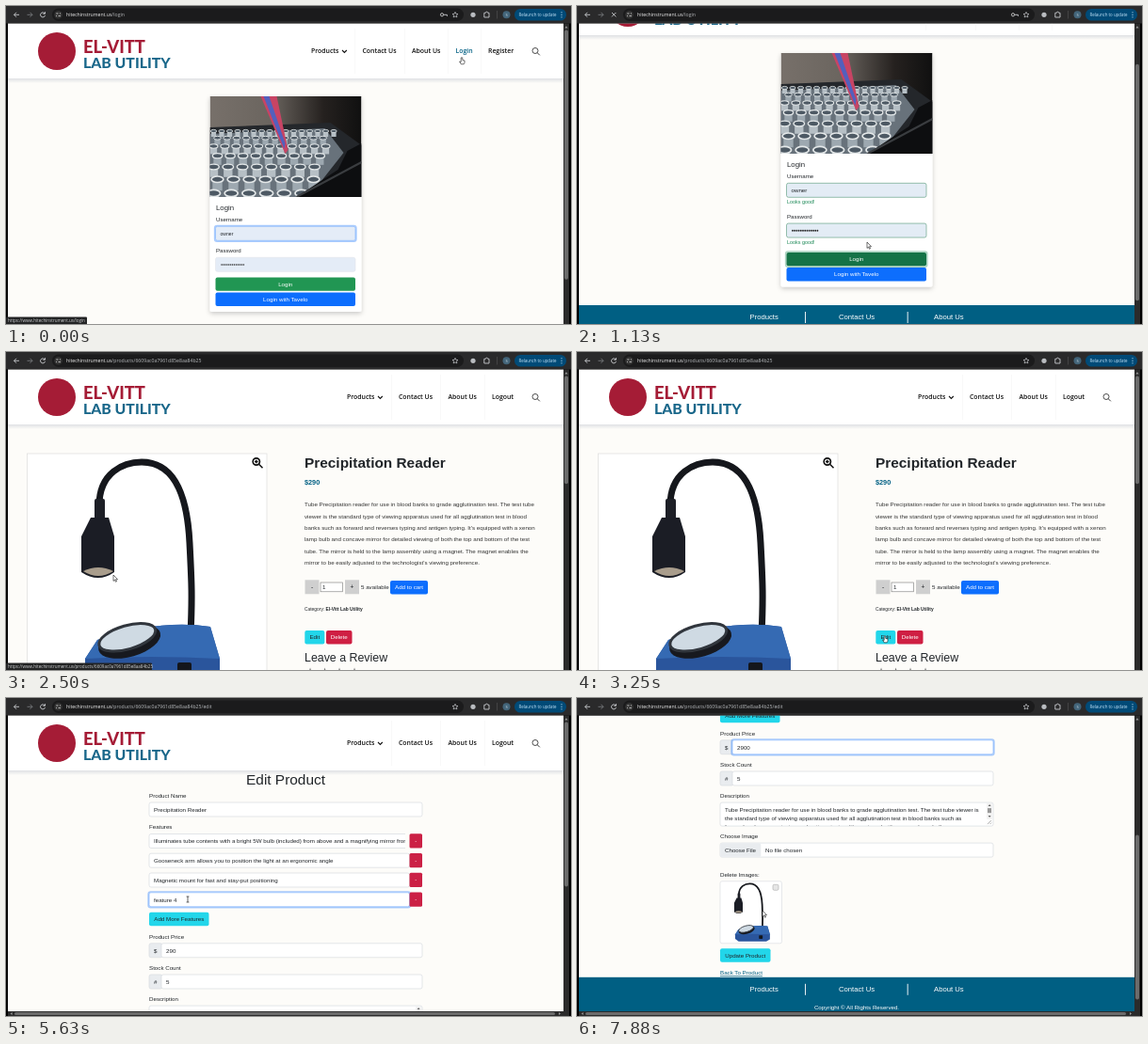
These frames come from a looping animation (600x338 px, 8000 ms). An HTML page:

```html
<!DOCTYPE html>
<html lang="en">
<head>
<meta charset="utf-8">
<title>Shop walkthrough</title>
<style>
html, body { margin: 0; width: 100%; height: 100%; overflow: hidden; background: #000; }
svg { display: block; width: 100%; height: 100%; }
text { font-family: "Liberation Sans", Arial, sans-serif; white-space: pre; }
.ui { font-family: "Open Sans", sans-serif; }
.nav { font-family: "Open Sans", sans-serif; font-weight: 600; }
.brand { font-family: Lato, sans-serif; font-weight: 800; }
</style>
</head>
<body>
<svg id="stage" viewBox="0 0 600 338" preserveAspectRatio="none"></svg>
<script>
const stage = document.getElementById('stage');
const LOOP = 8000, STEP = 125, INK = '#212529', TEAL = '#005f83';
const HOST = 'hitechinstrument.us', ITEM = '/products/6609ac0a7961d85e8aa84b25';
const PRODUCT = 'Precipitation Reader';

// Times at which the page changes
const SUBMIT = 1000, SHOP = 1750, EDIT = 3500, ADD = 4500, PRICE = 6500;

const CURSOR = [
  [125, 484, 55], [625, 308, 251], [1250, 308, 251], [1875, 114, 237], [2625, 114, 237],
  [3250, 327, 302], [3500, 327, 302], [4000, 237, 210], [4125, 237, 210], [4375, 183, 213],
  [4500, 183, 213], [4750, 193, 214], [6125, 193, 214], [6375, 190, 152], [6625, 190, 152],
  [6875, 192, 213], [7125, 192, 213], [7750, 197, 226]
];
const LOGIN_SCROLL = [[375, 0], [875, 46]];
const EDIT_SCROLL = [[5625, 0], [6125, 115.5], [7125, 115.5], [7750, 216]];

function tween(keys, t) {
  const i = keys.findIndex(k => k[0] > t);
  if (i === 0) return keys[0].slice(1);
  if (i < 0) return keys[keys.length - 1].slice(1);
  const a = keys[i - 1], b = keys[i], p = (t - a[0]) / (b[0] - a[0]);
  const e = p * p * (3 - 2 * p);
  return a.slice(1).map((v, j) => v + (b[j + 1] - v) * e);
}

// Drawing helpers; text is placed by the middle of its capitals
const text = (x, y, size, s, fill = INK, more = '') =>
  `<text x="${x}" y="${y + size * .36}" font-size="${size}" fill="${fill}" ${more}>${s}</text>`;
const rect = (x, y, w, h, fill, more = '') =>
  `<rect x="${x}" y="${y}" width="${w}" height="${h}" fill="${fill}" ${more}/>`;
const path = (d, fill, stroke = 'none', width = 1, more = '') =>
  `<path d="${d}" fill="${fill}" stroke="${stroke}" stroke-width="${width}" ${more}/>`;
const circle = (x, y, r, fill, more = '') => `<circle cx="${x}" cy="${y}" r="${r}" fill="${fill}" ${more}/>`;
const group = (x, y, s, scale = 1) => `<g transform="translate(${x} ${y}) scale(${scale})">${s}</g>`;
const MID = 'text-anchor="middle"', BOLD = 'font-weight="bold"';

const button = (x, y, w, label, fill, color = '#fff', h = 14.5) =>
  rect(x, y, w, h, fill, 'rx="2"') + text(x + w / 2, y + h / 2, 6.2, label, color, MID);
const ring = (x, y, w, h, color = '#0d6efd') =>
  rect(x - .8, y - .8, w + 1.6, h + 1.6, 'none', `rx="2.4" stroke="${color}" stroke-opacity=".35" stroke-width="1.7"`);
const field = (x, y, w, value = '', o = {}) =>
  (o.focus ? ring(x, y, w, 15) : '') +
  rect(x, y, w, o.h || 15, o.fill || '#fff', `rx="2" stroke="${o.focus ? '#86b7fe' : o.line || '#d7dbe0'}" stroke-width=".7"`) +
  text(x + 5, y + 7.5, o.size || 6.2, value);

function header(loggedIn, active) {
  const items = loggedIn
    ? [[362, 'Products'], [417, 'Contact Us'], [469.5, 'About Us'], [516, 'Logout']]
    : [[324, 'Products'], [378.5, 'Contact Us'], [431, 'About Us'], [477.5, 'Login'], [512, 'Register']];
  const x = items[0][0] + 33;
  return rect(2, 77, 590, 5, 'url(#shade)') + rect(2, 18, 590, 59, '#fff') +
    circle(54, 48, 20, '#a51c36') +
    text(82, 43.5, 18.4, 'EL-VITT', '#a51c36', 'class="brand"') +
    text(82, 60, 15.8, 'LAB UTILITY', '#19678a', 'class="brand"') +
    items.map(([x, s], i) => (i ? rect(x - 8, 24, .5, 48, '#f2f2f2') : '') +
      text(x, 47.5, 6.9, s, s === active ? TEAL : '#111', 'class="nav"')).join('') +
    path(`M${x} 47l2.4 2.4 2.4-2.4`, 'none', '#111', 1.1) +
    circle(562, 47.5, 3, 'none', 'stroke="#222" stroke-width=".8"') + path('M564.2 49.7l2.6 2.6', 'none', '#222', .9);
}

const footer = y => rect(2, y, 590, 44, TEAL) +
  [[183.5, 'Products'], [278, 'Contact Us'], [379, 'About Us']].map(([x, s]) => text(x, y + 12.3, 7.7, s, '#fff')).join('') +
  rect(242, y + 7, .9, 12, '#fff') + rect(350.7, y + 7, .9, 12, '#fff') +
  text(297, y + 32, 6.2, 'Copyright © All Rights Reserved.', '#fff', MID);

function photo() {
  let s = rect(0, 0, 161, 107, 'url(#bench)') + path('M0 33L128 28 161 52V107H0Z', '#24272b') +
    path('M0 40L122 34 142 60 105 107H0Z', '#68727b');
  for (let row = 0; row < 7; row++) {
    const k = 1 + row * .2, y = 37 + row * row * .75 + row * 6.5;
    for (let x = 4 + row % 2 * 4; x < 132 - row * 3; x += 8.5 * k) {
      s += rect(x - 2.6 * k, y, 5.2 * k, 6 * k, row % 2 ? '#9da8b0' : '#b6bfc5') +
        `<ellipse cx="${x}" cy="${y}" rx="${3.2 * k}" ry="${1.6 * k}" fill="#4d5964" stroke="#e3e7e8" stroke-width="${.8 * k}"/>`;
    }
  }
  return s + path('M161 50V107H92L136 78 146 58Z', '#0d0e10') + path('M92 107L161 70', 'none', '#3a3d40', 2) +
    path('M54 0H71L83 57 80 61 76 52Z', '#c84464') + path('M57 0H63L80 50 79 56Z', '#5360bd');
}

const lamp = () =>
  path('M77 55C77 20 103 9 122 9C162 9 171 55 173 95S176 150 174 192', 'none', '#15171c', 7) +
  path('M62 218L75 198Q140 176 195 184L205 218V238L190 247H76L62 236Z', '#2a559c') +
  path('M62 218L75 198Q140 176 195 184L205 218Q130 214 62 218Z', '#356ab3') +
  rect(160, 222, 15, 14, '#14161b', 'rx="2"') +
  '<g transform="rotate(-16 108 196)"><ellipse cx="108" cy="200" rx="34" ry="16" fill="#17191f"/>' +
  '<ellipse cx="107" cy="195" rx="31" ry="12.5" fill="#cfdae3" stroke="#31363d" stroke-width="3"/></g>' +
  rect(72, 48, 11, 26, '#1d1f26', 'rx="2"') + path('M68 68H87L93 88V126Q76 138 58 126V88Z', '#1b1d25') +
  path('M60 125Q76 117 92 125Q76 135 60 125Z', '#a99d8c');

function loginPage(t) {
  const done = t >= SUBMIT, d = done ? 19.5 : 0;
  const opts = done ? { fill: '#e3ecf5', line: '#6aa58a' } : { fill: '#e4ecf7', line: '#e4e7ec' };
  const good = y => done ? text(223, y, 5.4, 'Looks good!', '#198754') : '';
  return header(false, 'Login') +
    rect(216.5, 96, 161, 229 + d, '#fff', 'rx="2" filter="url(#drop)"') + group(216.5, 96, `<g clip-path="url(#frame)">${photo()}</g>`) +
    text(223, 214, 7.8, 'Login') + text(223, 226.5, 6.1, 'Username') +
    field(222.5, 234.3, 148.5, 'owner', { ...opts, size: done ? 6.2 : 5.1, focus: !done }) + good(254.5) +
    text(223, 260 + d / 2, 6.1, 'Password') +
    field(222.5, 267.3 + d / 2, 148.5, '', opts) +
    Array.from({ length: 13 }, (_, i) => circle(229 + i * (done ? 2.2 : 1.95), 275 + d / 2, done ? .9 : .75, '#222')).join('') +
    good(297.5) +
    (done ? ring(222.5, 288.5 + d, 148.5, 14.3, '#198754') : '') +
    button(222.5, 288.5 + d, 148.5, 'Login', done ? '#157347' : '#219653', '#fff', 14.3) +
    button(222.5, 304.5 + d, 148.5, 'Login with Tavelo', '#0d6efd') + footer(344.5 + d);
}

function productPage() {
  const lines = [
    'Tube Precipitation reader for use in blood banks to grade agglutination test. The test tube',
    'viewer is the standard type of viewing apparatus used for all agglutination test in blood',
    "banks such as forward and reverses typing and antigen typing. It's equipped with a xenon",
    'lamp bulb and concave mirror for detailed viewing of both the top and bottom of the test',
    'tube. The mirror is held to the lamp assembly using a magnet. The magnet enables the',
    "mirror to be easily adjusted to the technologist's viewing preference."
  ];
  const step = (x, s) => rect(x, 242.3, 15, 15, '#cfcfcf') + text(x + 7.5, 249.8, 6.5, s, INK, MID);
  return header(true) + rect(22.5, 108, 254.5, 255, '#fff', 'stroke="#dcdcdc" stroke-width=".7"') + group(22, 108, lamp()) +
    circle(265.8, 116.5, 3.6, 'none', 'stroke="#111" stroke-width="1.7"') +
    path('M268.5 119.2l4 4M264 116.5h3.6M265.8 114.7v3.6', 'none', '#111', 1.5) +
    text(317, 117.5, 15.4, PRODUCT, INK, BOLD) + text(317, 138.5, 7.3, '$290', TEAL, BOLD) +
    lines.map((s, i) => text(317, 162 + i * 12.35, 6.2, s, '#333')).join('') +
    step(317.5, '-') + rect(334, 245, 23.5, 9.8, '#fff', 'stroke="#777" stroke-width=".6"') + text(336, 250, 6.2, '1') +
    step(360, '+') + text(377, 250, 6.2, '5 available') + button(408, 243, 40, 'Add to cart', '#0d6efd') +
    text(317, 273, 4.9, `Category: <tspan ${BOLD}>El-Vitt Lab Utility</tspan>`) +
    button(317.3, 296, 21, 'Edit', '#22d6ea', INK) + button(340, 296, 27.5, 'Delete', '#cf1f43') +
    text(317, 324.3, 12.4, 'Leave a Review') +
    [323, 338.5, 354, 370].map(x => text(x, 338.5, 9, '★', '#777', MID + ' style="font-family:\'DejaVu Sans\',sans-serif"')).join('');
}

function editPage(t) {
  const added = t >= ADD, d = added ? 20.8 : 0, priceFocus = t >= PRICE;
  const label = (y, s) => text(152, y, 6.2, s);
  const feature = (y, s, focus) => field(152, y, 276.5, s, { focus }) +
    rect(428.5, y - .2, 13.5, 15.2, '#cb2045', 'rx="1.5"') + text(435.2, y + 7.2, 6, '-', '#fff', MID);
  const addon = (y, sign, value, focus) => rect(152, y, 14, 15, '#e9ecef', 'rx="2" stroke="#d7dbe0" stroke-width=".7"') +
    text(158.7, y + 7.5, 6.2, sign, INK, MID) + field(165, y, 277, value, { focus });
  const typed = 'feature 4'.slice(0, Math.max(0, Math.floor((t - 4800) / 70)));
  const y = 306.3 + d;
  return header(true) + text(297, 86.5, 15.4, 'Edit Product', INK, MID) +
    label(103.5, 'Product Name') + field(152, 111, 290, PRODUCT) + label(136.5, 'Features') +
    `<g clip-path="url(#row)">${field(152, 144.5, 276.5, 'Illuminates tube contents with a bright 5W bulb (included) from above and a magnifying mirror from below')}</g>` +
    rect(428.5, 144.3, 13.5, 15.2, '#cb2045', 'rx="1.5"') + text(435.2, 151.7, 6, '-', '#fff', MID) +
    feature(165.2, 'Gooseneck arm allows you to position the light at an ergonomic angle') +
    feature(186, 'Magnetic mount for fast and stay-put positioning') +
    (added ? feature(206.8, typed, !priceFocus) : '') +
    button(152, 207 + d, 63.5, 'Add More Features', '#22d6ea', INK) +
    label(232.5 + d, 'Product Price') + addon(240 + d, '$', t >= 6750 ? '2900' : '290', priceFocus) +
    label(265.8 + d, 'Stock Count') + addon(273.2 + d, '#', '5') +
    label(299.2 + d, 'Description') + field(152, y, 290, '', { h: 25 }) +
    `<svg x="152" y="${y}" width="290" height="24.6">` +
    ['Tube Precipitation reader for use in blood banks to grade agglutination test. The test tube viewer is',
     'the standard type of viewing apparatus used for all agglutination test in blood banks such as',
     "forward and reverses typing and antigen typing. It's equipped with a xenon lamp bulb"]
      .map((s, i) => text(5, 7.2 + i * 9.4, 6.2, s)).join('') +
    rect(283, .8, 6, 17, '#f3f3f3') + rect(284, 6, 4, 5, '#999') +
    path('M284.6 4l1.5-2 1.5 2zM284.6 14l1.5 2 1.5-2z', '#666') + path('M284 23l4-4M286.5 23l1.5-1.5', 'none', '#777', .6) + '</svg>' +
    label(341.8 + d, 'Choose Image') + field(152, 349.3 + d, 290) +
    rect(152.3, 349.6 + d, 43, 14.4, '#e9ecef', 'rx="1.5"') +
    text(157, 356.8 + d, 6.2, 'Choose File') + text(200, 356.8 + d, 6.2, 'No file chosen') +
    label(383.3 + d, 'Delete Images:') +
    rect(152, 390 + d, 65.5, 66, '#fff', 'rx="2" stroke="#dcdfe3" stroke-width=".7"') + group(152, 390.2 + d, lamp(), .258) +
    rect(208, 393.5 + d, 6, 6, t > 7600 ? '#e6e6e6' : '#fff', 'rx="1.4" stroke="#aaa" stroke-width=".6"') +
    button(152, 461.5 + d, 53.5, 'Update Product', '#22d6ea', INK) +
    text(152, 487.3 + d, 6.2, 'Back To Product', TEAL, 'text-decoration="underline"') + footer(492 + d);
}

function toolbar(url, login, loading) {
  const line = (d, color = '#c9cbce', w = .9) => path(d, 'none', color, w);
  return rect(0, 0, 600, 18.5, '#2a2a2b') + rect(49, 2.5, 437, 13.5, '#1b1b1c', 'rx="6.7"') +
    line('M14 9.3H8.6M11 6.8L8.5 9.3 11 11.8') + line('M22.5 9.3H28M25.5 6.8L28 9.3 25.5 11.8', '#77797c') +
    line(loading ? 'M37 7l4.4 4.4M41.4 7L37 11.4' : 'M41 7.8A2.5 2.5 0 1 0 41.5 10M41.5 6.2V8.3H39.4') +
    circle(55.5, 9.3, 4.3, '#333') + line('M53.3 8h2.2M57 8h1M53 10.6h1M55.5 10.6h2.5', '#ddd', .8) +
    text(64, 9.3, 5.15, `${HOST}<tspan fill="#b5b8bb">${url}</tspan>`, '#eee', 'class="ui"') +
    (login ? circle(463, 9.3, 1.6, 'none', 'stroke="#ccc" stroke-width=".9"') + line('M464.6 9.3h3.8v1.6') : '') +
    line('M477 6.4l.9 1.9 2.1.2-1.6 1.4.5 2.1-1.9-1.1-1.9 1.1.5-2.1-1.6-1.4 2.1-.2z', '#c9cbce', .7) +
    circle(496, 9.3, 2.6, '#b9bcc0') + line('M507.8 7.3h1.6a1.1 1.1 0 0 1 2.2 0h1.4v4.7h-5.2z') +
    rect(521, 5, .6, 8.5, '#555') + circle(531.5, 9.3, 4, '#43657a') + text(531.5, 9.3, 4, 'S', '#dce6ee', `${MID} class="ui"`) +
    rect(540, 3, 55, 12.6, '#004a77', 'rx="6.3"') + text(544.5, 9.3, 4.4, 'Relaunch to update', '#c8e6fb', 'class="ui"') +
    [6.8, 9.3, 11.8].map(y => circle(590, y, .6, '#c8e6fb')).join('');
}

function scrollbars(scroll, height, wide) {
  const view = wide ? 315 : 320, k = (wide ? 300 : 305) / height;
  return rect(592, 18.5, 6, 320, '#2b2b2b') + rect(593, 25.5 + scroll * k, 4, view * k, '#6c6c6c', 'rx="2"') +
    path('M593.4 23.5l1.6-2.2 1.6 2.2z', '#999') +
    (wide ? rect(2, 333, 596, 5, '#2b2b2b') + rect(9, 334, 574, 3, '#6c6c6c', 'rx="1.5"') +
      path('M6.6 334v3l-2-1.5zM587 334v3l2-1.5z', '#999') : '');
}

const status = (s, w) => rect(0, 330.5, w, 8, '#222324', 'rx="1"') + text(2, 334.7, 4.55, `https://www.${HOST}${s}`, '#cfd1d3', 'class="ui"');

const POINTERS = {
  arrow: path('M0 0V6.4L1.5 5.1 2.5 7.3 3.5 6.8 2.5 4.7H4.5Z', '#fff', '#111', .6),
  hand: path('M-.8 0q.8-1 1.6 0V2.4L3 3V5.2L2.2 6.8H-.8L-2.4 4 -.8 4.4Z', '#fff', '#111', .6),
  beam: path('M-1.4-3H1.4M0-3V3M-1.4 3H1.4', 'none', '#222', .7)
};

function pointer(t) {
  const [x, y] = tween(CURSOR, t);
  const hand = t < 250 || t >= 625 && t < SUBMIT || t >= 3125 && t < EDIT || t >= 4375 && t < 4625;
  const beam = t >= 4625 && t < 7250;
  return group(x, y, POINTERS[hand ? 'hand' : beam ? 'beam' : 'arrow']);
}

const DEFS = `<defs>
  <linearGradient id="shade" x2="0" y2="1"><stop stop-color="#dfe1e4"/><stop offset="1" stop-color="#fdfcf9"/></linearGradient>
  <linearGradient id="bench"><stop stop-color="#77706a"/><stop offset=".4" stop-color="#6b655f"/><stop offset=".75" stop-color="#25211f"/><stop offset="1" stop-color="#101010"/></linearGradient>
  <filter id="drop" x="-10%" y="-10%" width="120%" height="120%"><feDropShadow dx="0" dy="2" stdDeviation="2.5" flood-opacity=".2"/></filter>
  <clipPath id="frame"><rect width="161" height="107"/></clipPath>
  <clipPath id="row"><rect x="151" y="143" width="273" height="18"/></clipPath>
  <clipPath id="view"><rect x="2" y="18.5" width="590" height="320"/></clipPath></defs>`;

function draw(t) {
  const login = t < SHOP, edit = t >= EDIT;
  const scroll = login ? tween(LOGIN_SCROLL, t)[0] : edit ? tween(EDIT_SCROLL, t)[0] : 0;
  const page = login ? loginPage(t) : edit ? editPage(t) : productPage();
  const height = login ? (t < SUBMIT ? 368 : 388) : edit ? 540 : 850;
  const url = login ? '/login' : ITEM + (edit ? '/edit' : '');
  stage.innerHTML = DEFS + rect(0, 0, 600, 338, '#000') +
    `<g clip-path="url(#view)">${rect(2, 18, 590, 320, '#fdfcf9')}${group(0, -scroll, page)}</g>` +
    scrollbars(scroll, height, edit) + toolbar(url, login, login && t >= SUBMIT) +
    (t < 250 ? status('/login', 86) : t >= SHOP && t < 2625 ? status(ITEM, 155) : '') + pointer(t);
}

let start, last;
function tick(now) {
  start ??= now;
  const t = Math.floor((now - start) % LOOP / STEP) * STEP;
  if (t !== last) draw(last = t);
  requestAnimationFrame(tick);
}
draw(0);
requestAnimationFrame(tick);
</script>
</body>
</html>
```
